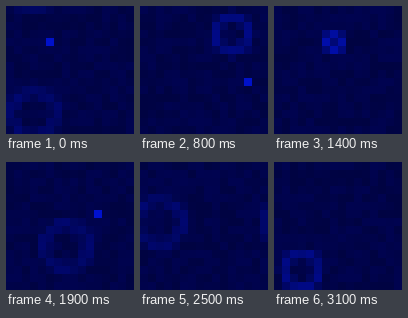
An HTML page with a canvas that plays this animation: 128x128 px, repeating every 3200 ms.

```html
<!DOCTYPE html>
<html lang="en">
<head>
<meta charset="utf-8">
<title>Rain on a pixel pond</title>
<style>
  html, body { margin: 0; width: 100%; height: 100%; overflow: hidden; background: #00034a; }
  canvas { display: block; width: 100vw; height: 100vh; image-rendering: pixelated; }
</style>
</head>
<body>
<canvas width="128" height="128"></canvas>
<script>
const ctx = document.querySelector('canvas').getContext('2d');
const CELL = 8, GRID = 16, STEP = 100, STEPS = 32;
const SPEED = 0.7, LIFE = 6;

// Column, row and starting step of each drop.
const drops = [
  [5, 4, 0], [11, 3, 5], [13, 9, 8], [7, 4, 13],
  [7, 10, 15], [11, 6, 19], [2, 7, 21], [3, 13, 28]
];

function hash(x, y) {
  const n = Math.sin(x * 127.1 + y * 311.7) * 43758.5453;
  return n - Math.floor(n);
}

// Ripples leave one edge and return at the opposite one.
function wrappedGap(a, b) {
  const gap = Math.abs(a - b);
  return Math.min(gap, GRID - gap);
}

function ripple(x, y, step) {
  let glow = 0;
  for (const [cx, cy, start] of drops) {
    const age = (step - start + STEPS) % STEPS;
    if (age >= LIFE) continue;
    const distance = Math.hypot(wrappedGap(x, cx), wrappedGap(y, cy));
    const offset = Math.abs(distance - age * SPEED);
    const ring = Math.max(0, 1 - offset ** 1.6);
    glow += ring * (1 - age / LIFE) ** 1.25;
  }
  return Math.min(1, glow);
}

function shimmer(x, y, step) {
  const turns = 1 + Math.floor(hash(y + 40, x) * 3);
  const phase = hash(x, y) + turns * step / STEPS;
  return Math.sin(phase * 2 * Math.PI);
}

function draw(step) {
  for (let y = 0; y < GRID; y++) {
    for (let x = 0; x < GRID; x++) {
      const glow = ripple(x, y, step);
      const green = 3 + 14 * glow;
      const blue = 73 + 7 * shimmer(x, y, step) + 135 * glow;
      ctx.fillStyle = `rgb(0, ${Math.round(green)}, ${Math.round(blue)})`;
      ctx.fillRect(x * CELL, y * CELL, CELL, CELL);
    }
  }
}

function tick() {
  draw(Math.floor(performance.now() / STEP) % STEPS);
  requestAnimationFrame(tick);
}
tick();
</script>
</body>
</html>
```
